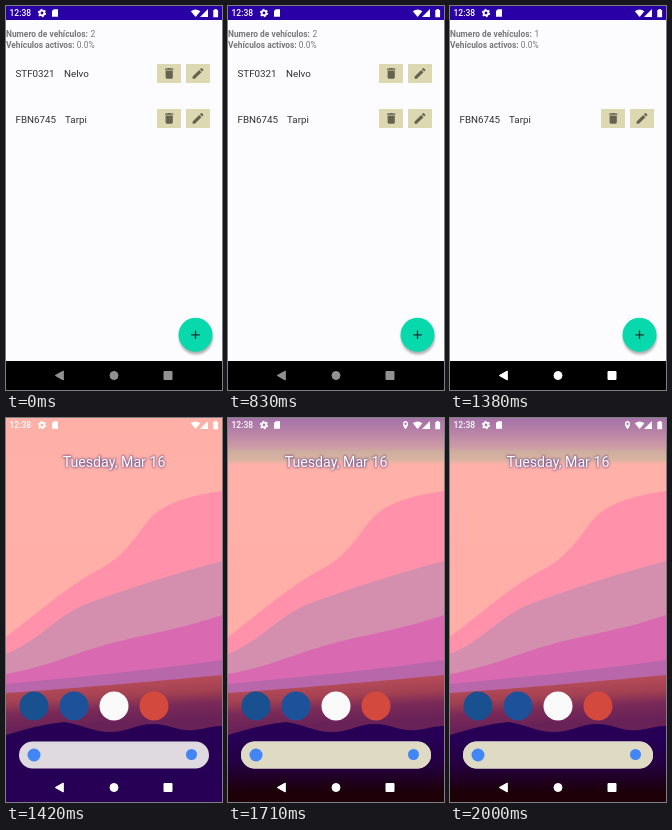
Write an HTML page that moves like this. It is 216 px wide and 384 px high and loops after 2.04 s.

```html
<!DOCTYPE html>
<html lang="es">
<head>
<meta charset="utf-8">
<title>Lista de vehículos</title>
<style>
  html, body { margin: 0; width: 100%; height: 100%; overflow: hidden; background: #000; }
  svg { display: block; width: 100%; height: 100%; font-family: Roboto, sans-serif; }
  .anim { animation: 2040ms step-end infinite; }
  .before { animation-name: before; }
  .after { animation-name: after; }
  .home { animation-name: home; }
  .nav { animation-name: nav; }
  .scrim { animation-name: scrim; animation-timing-function: linear; }
  /* row removed at 920 ms, launcher shown at 1420 ms */
  @keyframes before { 0% { opacity: 1 } 45.098%, 100% { opacity: 0 } }
  @keyframes after { 0% { opacity: 0 } 45.098%, 100% { opacity: 1 } }
  @keyframes home { 0% { opacity: 0 } 69.608%, 100% { opacity: 1 } }
  @keyframes nav { 0% { fill: #929292; stroke: #929292 } 45.098%, 100% { fill: #fff; stroke: #fff } }
  @keyframes scrim { 0%, 69.608% { opacity: 0 } 80.392%, 100% { opacity: 1 } }
  .info { font-size: 8.4px; fill: #77777b; }
  .info .label { font-weight: 700; }
  .row { font-size: 9.8px; fill: #303033; }
</style>
</head>
<body>
<svg viewBox="0 0 216 384">
  <defs>
    <linearGradient id="sky" x2="0" y2="1">
      <stop offset="0" stop-color="#ffb1a8"/>
      <stop offset="1" stop-color="#ffaca8"/>
    </linearGradient>
    <linearGradient id="dusk" gradientUnits="userSpaceOnUse" x1="0" y1="262" x2="3" y2="312">
      <stop offset="0" stop-color="#b65576"/>
      <stop offset=".2" stop-color="#b44a58"/>
      <stop offset=".45" stop-color="#a34152"/>
      <stop offset=".7" stop-color="#7a2a58"/>
      <stop offset="1" stop-color="#692257"/>
    </linearGradient>
    <linearGradient id="topShade" x2="0" y2="1">
      <stop offset="0" stop-color="#a472a8"/>
      <stop offset=".3" stop-color="#b883a6"/>
      <stop offset=".6" stop-color="#cd9ba6"/>
      <stop offset=".72" stop-color="#d0ae9f"/>
      <stop offset=".88" stop-color="#d8b4a0"/>
      <stop offset="1" stop-color="#ffb1a8" stop-opacity="0"/>
    </linearGradient>
    <linearGradient id="bottomShade" x2="0" y2="1">
      <stop offset="0" stop-color="#1c0004" stop-opacity="0"/>
      <stop offset=".4" stop-color="#1c0004" stop-opacity=".25"/>
      <stop offset=".85" stop-color="#1c0004" stop-opacity=".95"/>
    </linearGradient>
    <filter id="blur" x="-30%" y="-30%" width="160%" height="160%"><feGaussianBlur stdDeviation="1"/></filter>
    <g id="buttons">
      <path fill="#dcd9b2" d="M151 0h24v19h-24zM180 0h24v19h-24z"/>
      <g fill="#666250">
        <path transform="translate(156 2.2) scale(.6)" d="M6 19c0 1.1.9 2 2 2h8c1.1 0 2-.9 2-2V7H6zM19 4h-3.5l-1-1h-5l-1 1H5v2h14z"/>
        <path transform="translate(184.8 2.2) scale(.6)" d="M3 17.25V21h3.75L17.81 9.94l-3.75-3.75zM20.71 7.04a1 1 0 000-1.41l-2.34-2.34a1 1 0 00-1.41 0l-1.83 1.83 3.75 3.75z"/>
      </g>
    </g>
    <g id="status" fill="#fff">
      <text x="3.5" y="10.3" font-size="8.5" font-weight="500">12:38</text>
      <circle cx="36" cy="7" r="2.3" fill="none" stroke="#fff" stroke-width="1.8"/>
      <circle cx="36" cy="7" r="3.6" fill="none" stroke="#fff" stroke-width="1.2" stroke-dasharray="1.8 1.97"/>
      <path d="M47.8 3.2H52v7.6h-6V5z"/>
      <path d="M184.8 5.2q4.8-3.6 9.6 0l-4.8 5.8zM202 3v8h-8z"/>
      <path d="M207.3 4h1.2V3h2.4v1h1.2v7.2h-4.8z"/>
    </g>
  </defs>

  <g>
    <rect width="216" height="384" fill="#fcfcfe"/>
    <rect width="216" height="14" fill="#2900a6"/>
    <use href="#status"/>
    <g class="info">
      <text class="label" x="0" y="31">Numero de vehículos:</text>
      <text class="anim before" x="84.5" y="31">2</text>
      <text class="anim after" x="84.5" y="31">1</text>
      <text x="0" y="42.3"><tspan class="label">Vehículos activos:</tspan> 0.0%</text>
    </g>
    <g class="row">
      <g class="anim before">
        <text x="9.5" y="71">STF0321</text><text x="58" y="71">Nelvo</text>
        <use href="#buttons" y="58"/>
      </g>
      <text x="9.5" y="116.5">FBN6745</text><text x="59" y="116.5">Tarpi</text>
      <use href="#buttons" y="103"/>
    </g>
    <circle cx="190" cy="331.5" r="17" fill="#777" opacity=".55" filter="url(#blur)"/>
    <circle cx="189.5" cy="328.8" r="17" fill="#08d9ad"/>
    <path d="M185.2 328.8h8.6M189.5 324.5v8.6" stroke="#17342e" stroke-width="1.3"/>
    <rect y="355" width="216" height="29"/>
  </g>

  <g class="anim home">
    <rect width="216" height="384" fill="url(#sky)"/>
    <path fill="#ff91ab" d="M0 219C38 190 62 168 94 151S134 108 150 95 190 77 216 73V384H0z"/>
    <path fill="#d58fae" d="M0 236C38 220 50 196 88 183S165 156 216 143V384H0z"/>
    <path fill="#d969b0" d="M0 256C45 248 70 234 110 224S175 211 216 197V384H0z"/>
    <path fill="#b868aa" d="M0 266C60 260 140 253 216 242V384H0z"/>
    <path fill="url(#dusk)" d="M0 275C60 271 140 264 216 257V384H0z"/>
    <path fill="#270056" d="M0 317C20 311 38 306 58 304 75 306 86 314 104 314S130 306 147 306 172 314 188 312 206 308 216 308V384H0z"/>
    <g class="anim scrim">
      <rect width="216" height="48" fill="url(#topShade)"/>
      <rect y="320" width="216" height="64" fill="url(#bottomShade)"/>
    </g>
    <use href="#status"/>
    <path class="anim scrim" fill="#fff" fill-rule="evenodd" d="M177.5 11.2C173.6 7 174.6 3 177.5 3s3.9 4 0 8.2zM177.5 4.6a1.2 1.2 0 100 2.4 1.2 1.2 0 000-2.4z"/>
    <g font-size="14.2" text-anchor="middle">
      <text x="108.2" y="49.2" fill="#76518b" stroke="#76518b" filter="url(#blur)">Tuesday, Mar 16</text>
      <text x="108" y="48.8" fill="#fff">Tuesday, Mar 16</text>
    </g>
    <circle cx="28" cy="288" r="14.5" fill="#19508f"/>
    <circle cx="68" cy="288" r="14.5" fill="#1d529b"/>
    <circle cx="108" cy="288" r="14.5" fill="#fafafa"/>
    <circle cx="148" cy="288" r="14.5" fill="#d3493e"/>
    <rect x="13" y="323.5" width="190" height="27" rx="13.5" fill="#dedbe0"/>
    <rect class="anim scrim" x="13" y="323.5" width="190" height="27" rx="13.5" fill="#dedac4"/>
    <circle cx="28" cy="337" r="6.5" fill="#4285f4"/>
    <circle cx="185.5" cy="336.5" r="5.5" fill="#4285f4"/>
  </g>

  <g class="anim nav" stroke-width="1" stroke-linejoin="round">
    <path d="M49.3 369.5l8-4.5v9z"/>
    <circle cx="108" cy="369.5" r="4"/>
    <path d="M158 365.5h8v8h-8z"/>
  </g>
</svg>
</body>
</html>
```
